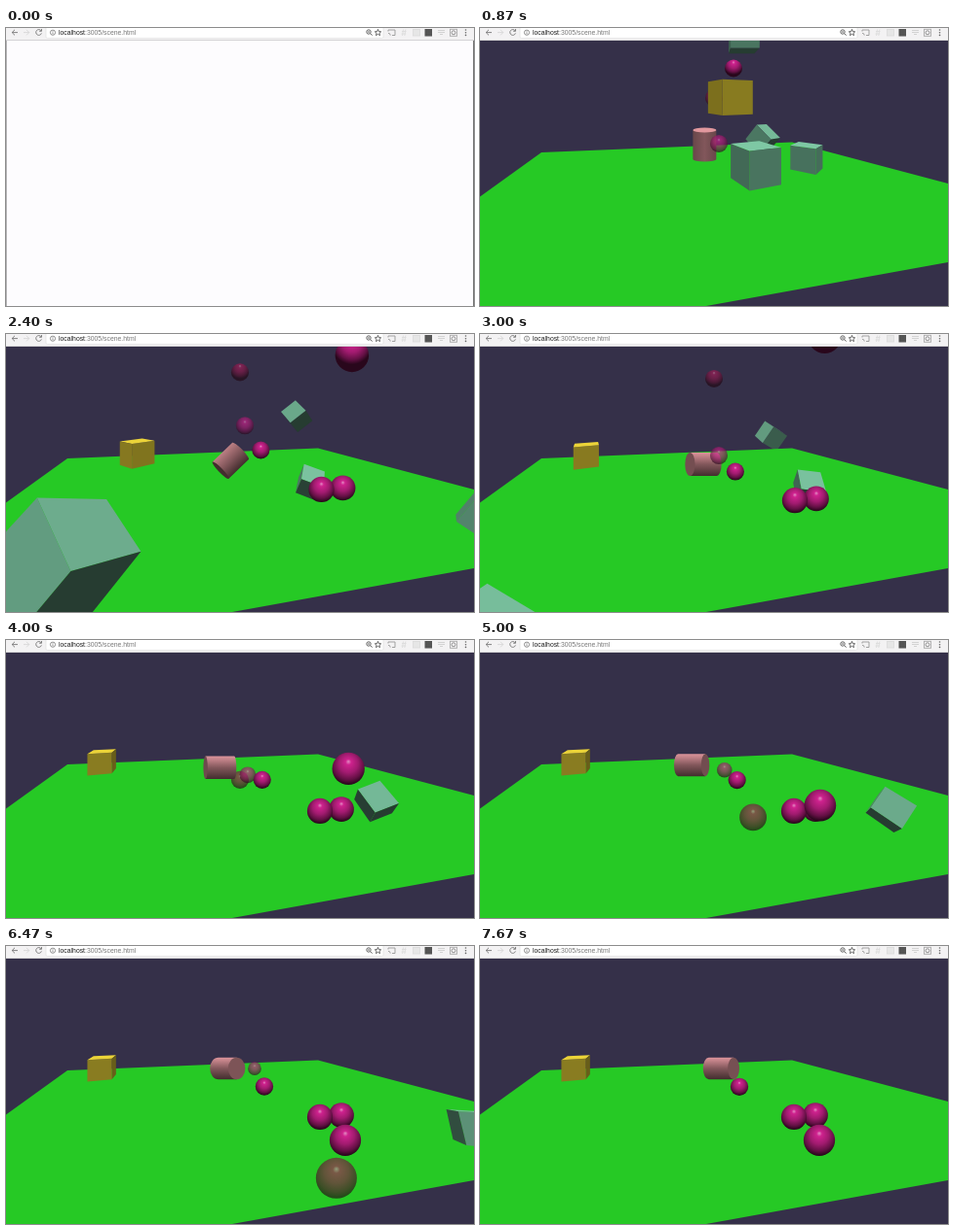
An HTML page with a canvas for the animation above (7740 ms loop, 480 by 286 pixels).

```html
<!DOCTYPE html>
<html lang="en">
<head>
<meta charset="utf-8">
<title>Scene</title>
<style>
html, body { margin: 0; width: 480px; height: 286px; overflow: hidden; background: #fdfcfe; }
canvas, svg { position: absolute; left: 0; top: 0; display: block; }
text { font: 6.85px "Liberation Sans", Arial, sans-serif; }
</style>
</head>
<body>
<canvas id="stage" width="480" height="286"></canvas>
<svg width="480" height="14" fill="none" stroke-width="0.9">
  <rect width="480" height="13" fill="#f3f2f3"/>
  <rect x="41" y="-3" width="346" height="13.5" rx="1.5" fill="#fff" stroke="#dedede" stroke-width="0.6"/>
  <rect y="12" width="480" height="1" fill="#d4d3d5"/>
  <path d="M12 4.6H6.2M9 1.8L6.2 4.6L9 7.4" stroke="#777"/>
  <path d="M18 4.6H23.8M21 1.8L23.8 4.6L21 7.4" stroke="#d6d6d6"/>
  <path d="M36 2.8A2.9 2.9 0 1 0 36.4 5.4M36.5 1V3.3H34.2" stroke="#777"/>
  <circle cx="48" cy="4.7" r="2.6" stroke="#666" stroke-width="0.7"/>
  <path d="M48 4.3V6.2M48 3V3.7" stroke="#666" stroke-width="0.7"/>
  <text x="54" y="7" fill="#777"><tspan fill="#1c1c1c">localhost</tspan>:3005/scene.html</text>
  <circle cx="372" cy="4" r="2.2" stroke="#555"/>
  <path d="M373.7 5.7L375.6 7.6M371 4H373" stroke="#555"/>
  <path d="M381.5 1.4L382.4 3.6L384.7 3.8L383 5.3L383.5 7.6L381.5 6.4L379.5 7.6L380 5.3L378.3 3.8L380.6 3.6Z" stroke="#444" stroke-width="0.8"/>
  <path d="M392 3.5V2H399V7.5H396M392 5.3A2.2 2.2 0 0 1 394.2 7.5" stroke="#999"/>
  <path d="M407.5 1.5L406.5 8M409.8 1.5L408.8 8M406 3.5H410.5M405.6 6H410.2" stroke="#dcdcdc"/>
  <rect x="417.5" y="1.5" width="7" height="6.5" fill="#e6e6e6" stroke="#dcdcdc"/>
  <rect x="429.5" y="1" width="7.5" height="7.5" fill="#555"/>
  <path d="M443 2.5H450M443 4.5H450M445 6.5H448" stroke="#cfcfcf"/>
  <rect x="455.5" y="1.3" width="7" height="7" stroke="#aaa"/>
  <circle cx="459" cy="4.8" r="2" stroke="#888"/>
  <g fill="#666"><circle cx="471.5" cy="2" r=".8"/><circle cx="471.5" cy="4.7" r=".8"/><circle cx="471.5" cy="7.4" r=".8"/></g>
</svg>
<script>
const ctx = document.getElementById('stage').getContext('2d');
const LOOP = 7740, STEP = 200 / 3;
// One unit is a ball's radius; a ground point further below the horizon is nearer.
const CENTER = 240, HORIZON = 72, FOCAL = 230, SCALE = 0.112, HALF_G = 6, SPIN_START = 0.87;
const TEAL = [140, 222, 182], YELLOW = [262, 236, 62], PINK = [245, 165, 172];
const MAGENTA = [206, 34, 142], WINE = [165, 28, 88];

// Bodies roll over the ground from one spot to another during span (seconds).
// hops are the moments of touching the ground; after exit a body drops off the edge.
// Boxes turn as [pitch, yaw, roll], starting at turn and changing by spin per second.
const front = { size: 3.8, from: [282, 158], to: [136, 232], span: [0.87, 1.87], hops: [-1.5, 0.87], exit: 2.2,
  turn: [0, -0.42, 0], spin: [0.7, 0.07, -0.4] };
const right = { size: 3, from: [335, 145], to: [447, 190], span: [0.87, 1.87], hops: [-2, 0.85],
  turn: [0, -0.88, 0], spin: [0.52, 0.76, -0.84] };
const roller = { size: 2.1, from: [290, 158], to: [481, 202], span: [1.87, 6.47], hops: [0, 1.55],
  turn: [0.38, 0.63, 0.57], spin: [0.12, -0.23, -0.27] };
const back = { size: 2.9, from: [270, 158], to: [298, 130], span: [0.87, 1.87], stays: true, hops: [-4.5, 1.3, 3.24], exit: 3.24,
  turn: [0, 0, 0], spin: [-0.58, 0.1, -0.37] };
const gold = { size: 2.95, from: [256, 174], to: [99, 135.5], span: [0.87, 3.6], ease: 1.8, stays: true, hops: [-0.38, 1.87, 2.8, 3.3],
  turn: [0, -0.43, 0], spin: [0, 0.7, 0], stop: 3.25 };

const deep = { from: [240, 153], to: [339, 260], span: [4, 6.47], hops: [-3.1, 1.2, 4, 4.5], exit: 6.6, color: WINE, alpha: 0.65 };
const far = { from: [245, 153], to: [255, 133], span: [3, 6.47], hops: [-0.3, 1.26, 3.2], exit: 7.1, color: MAGENTA, alpha: 0.65 };
const mid = { from: [260, 152], to: [266, 154], span: [0.87, 7.67], hops: [-3.3, 1.32, 2.81, 3.2], color: MAGENTA };
const pairRight = { from: [346, 187], to: [344, 187], span: [1.9, 4], stays: true, hops: [-2.7, 1.95, 2.85, 3.4], color: MAGENTA };
const pairLeft = { ...pairRight, from: [324, 189], to: [322, 189] };
const bouncer = { from: [356, 228], to: [348, 216], span: [1.9, 5.4], stays: true, hops: [-4, 1.44, 4.28, 5.44, 5.9], color: MAGENTA };

const clamp = (v, lo, hi) => Math.min(hi, Math.max(lo, v));
const lerp = (a, b, u) => a + (b - a) * u;
const css = (c, k = 1) => `rgb(${c.map(v => Math.min(255, Math.round(v * k)))})`;
const light = (ny, nz) => clamp(0.43 - 0.47 * ny - 0.1 * nz, 0.27, 1);

function height(hops, t) {
  const i = hops.findIndex(h => h > t);
  return i > 0 ? HALF_G * (t - hops[i - 1]) * (hops[i] - t) : 0;
}

function place(body, t) {
  const { from, to, span, ease = 1, hops, exit = Infinity, size = 2 } = body;
  const u = clamp((t - span[0]) / (span[1] - span[0]), 0, body.stays ? 1 : Infinity);
  const [x, ground] = from.map((v, i) => lerp(v, to[i], 1 - (1 - u) ** ease));
  const s = SCALE * (ground - HORIZON);
  const drop = t > exit ? HALF_G * (t - exit) ** 2 : 0;
  return { x, y: ground - s * (size / 2 + height(hops, t) - drop), s };
}

function polygon(points, color) {
  ctx.beginPath();
  points.forEach(([x, y]) => ctx.lineTo(x, y));
  ctx.closePath();
  ctx.fillStyle = color;
  ctx.fill();
}

function rotate([x, y, z], [pitch, yaw, roll]) {
  const spin = (a, b, angle) => {
    const c = Math.cos(angle), s = Math.sin(angle);
    return [a * c - b * s, a * s + b * c];
  };
  [z, x] = spin(z, x, yaw);
  [y, z] = spin(y, z, pitch);
  [x, y] = spin(x, y, roll);
  return [x, y, z];
}

function drawBox(box, t, color) {
  const { x, y, s } = place(box, t);
  const age = Math.min(t, box.stop || t) - SPIN_START;
  const angles = box.turn.map((a, i) => a + box.spin[i] * age);
  const project = corner => {
    const [dx, dy, dz] = rotate(corner, angles).map(v => v * box.size / 2);
    const k = 1 / (1 + dz * s / FOCAL);
    return [CENTER + (x - CENTER + dx * s) * k, HORIZON + (y - HORIZON + dy * s) * k];
  };
  for (let i = 0; i < 3; i++) for (const side of [-1, 1]) {
    const quad = [[-1, -1], [1, -1], [1, 1], [-1, 1]].map(([a, b]) => {
      const corner = [];
      corner[i] = side; corner[(i + 1) % 3] = a; corner[(i + 2) % 3] = b;
      return project(corner);
    });
    const [p, q, r, w] = quad;
    const area = (r[0] - p[0]) * (w[1] - q[1]) - (r[1] - p[1]) * (w[0] - q[0]);
    const normal = rotate([0, 1, 2].map(k => k === i ? side : 0), angles);
    if (side * area < 0) polygon(quad, css(color, light(normal[1], normal[2])));
  }
}

function drawBall(ball, t) {
  const { x, y, s: r } = place(ball, t), { color, alpha = 1 } = ball;
  // High balls show their dark underside.
  const top = y - r * clamp((HORIZON - y) / 120, 0, 0.6);
  const g = ctx.createRadialGradient(x, top - r * 0.45, 0, x, top - r * 0.22, r * 1.18);
  g.addColorStop(0, css(color.map(v => lerp(v, 245, 0.5))));
  g.addColorStop(0.15, css(color));
  g.addColorStop(0.5, css(color, 0.78));
  g.addColorStop(0.8, css(color, 0.48));
  g.addColorStop(1, css(color, 0.2));
  ctx.globalAlpha = alpha;
  ctx.beginPath();
  ctx.arc(x, y, r, 0, 2 * Math.PI);
  ctx.fillStyle = g;
  ctx.fill();
  ctx.globalAlpha = 1;
}

// Lands upright, tips over, then rolls to and fro.
function drawCylinder(t) {
  const fall = clamp((t - 0.9) / 1.9, 0, 1) ** 2.6, tip = fall * Math.PI / 2;
  const roll = Math.max(t, 2.9);
  const heading = 0.23 + 0.67 * Math.sin((roll - 4.75) * 0.9);
  const x = 217 + 3.7 * (roll - 4.8) ** 2;
  const y = 120 + 14 * Math.sqrt(fall) - 8 * clamp((t - 3) / 3, 0, 1) - 150 * Math.max(0, 0.87 - t) ** 2;
  const toward = Math.sin(tip) * Math.sin(heading) + 0.2 * Math.cos(tip);
  const flip = toward < 0 ? -1 : 1, tilt = Math.abs(toward);
  const nx = flip * Math.sin(tip) * Math.cos(heading), ny = -flip * Math.cos(tip);
  const half = 15 * Math.hypot(nx, ny), r = 12 - 0.8 * clamp((t - 3) / 3, 0, 1);
  const side = nx / Math.hypot(nx, ny);
  ctx.save();
  ctx.translate(x, y);
  ctx.rotate(Math.atan2(ny, nx));
  const g = ctx.createLinearGradient(0, -r, 0, r);
  g.addColorStop(0, css(PINK, light(-side, 0)));
  g.addColorStop(0.5, css(PINK, light(0, -1)));
  g.addColorStop(1, css(PINK, light(side, 0)));
  ctx.fillStyle = g;
  ctx.beginPath();
  ctx.ellipse(-half, 0, r * tilt, r, 0, Math.PI / 2, Math.PI * 1.5);
  ctx.lineTo(half, -r);
  ctx.lineTo(half, r);
  ctx.fill();
  ctx.fillStyle = css(PINK, light(ny, -tilt));
  ctx.beginPath();
  ctx.ellipse(half, 0, r * tilt, r, 0, 0, 2 * Math.PI);
  ctx.fill();
  ctx.restore();
}

function drawBlank() {
  ctx.fillStyle = '#fdfcfe';
  ctx.fillRect(0, 0, 480, 286);
  ctx.fillStyle = '#b5b4b6';
  ctx.fillRect(0, 0, 1, 286);
  ctx.fillStyle = '#777';
  ctx.fillRect(479, 0, 1, 286);
}

function drawScene(t) {
  ctx.fillStyle = '#353049';
  ctx.fillRect(0, 0, 480, 286);
  const gone = t > far.exit;
  drawBox(back, t, TEAL);
  if (gone) drawBall(far, t);
  polygon([[0, 173.5], [63, 128], [320, 117.5], [480, 160], [480, 241], [232, 286], [0, 286]], '#26c925');
  drawBall(deep, t);
  drawCylinder(t);
  if (!gone) drawBall(far, t);
  drawBox(gold, t, YELLOW);
  drawBox(roller, t, TEAL);
  for (const ball of [mid, pairRight, pairLeft, bouncer]) drawBall(ball, t);
  drawBox(right, t, TEAL);
  drawBox(front, t, TEAL);
}

const start = performance.now();
function tick() {
  const now = (performance.now() - start) % LOOP;
  const step = Math.min(115, Math.floor((now + 4) / STEP));
  if (step === 0) drawBlank();
  else drawScene(step * STEP / 1000);
  requestAnimationFrame(tick);
}
tick();
</script>
</body>
</html>
```
